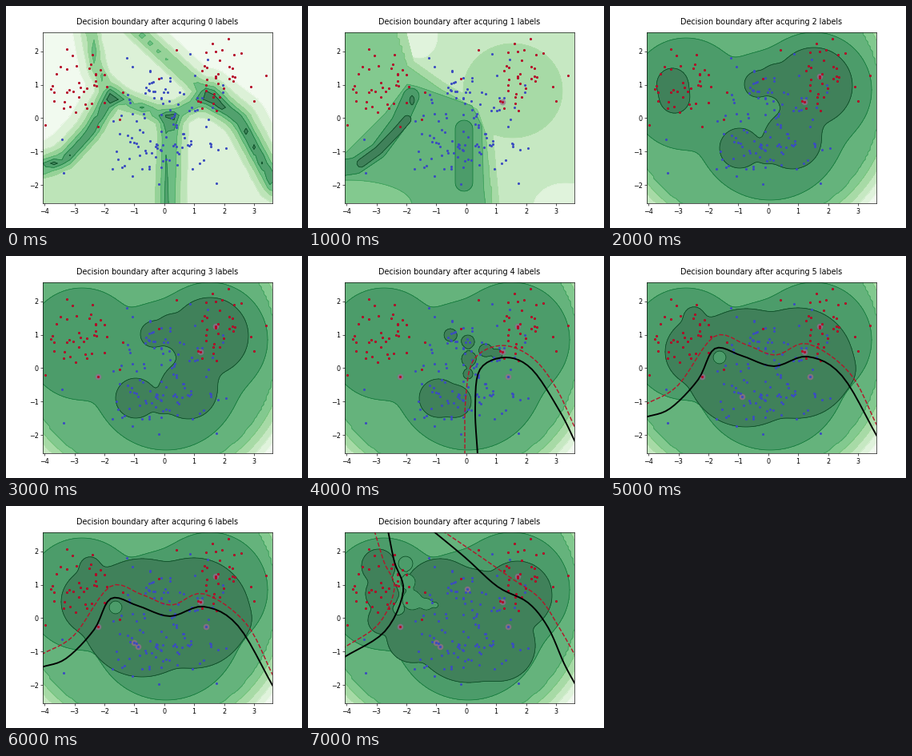
A matplotlib script for the animation above (8 s loop, 370 by 278 pixels).

```python
import numpy as np
import matplotlib.pyplot as plt
from matplotlib.animation import ArtistAnimation

W, H, DPI = 370, 278, 64
PX = 72 / DPI  # points per pixel
LEFT, RIGHT, TOP, BOTTOM = 46.25, 333, 33.36, 247.42
BLUE, RED = "#3b4cc0", "#b40426"

plt.rcParams["font.family"] = "DejaVu Sans"
fig = plt.figure(figsize=(W / DPI, H / DPI), dpi=DPI, facecolor="white")
ax = fig.add_axes([LEFT / W, 1 - BOTTOM / H, (RIGHT - LEFT) / W, (BOTTOM - TOP) / H])

# The axes use stage pixels; ticks carry the data values.
ax.set(xlim=(LEFT, RIGHT), ylim=(BOTTOM, TOP))


def names(values):
    return [str(v).replace("-", "\u2212") for v in values]


ax.set_xticks([197.7 + 37.4 * v for v in range(-4, 4)], names(range(-4, 4)))
ax.set_yticks([140.5 - 41.9 * v for v in range(-2, 3)], names(range(-2, 3)))
ax.tick_params(labelsize=8.03 * PX, length=2.8 * PX, width=0.64 * PX, pad=2.8 * PX)
for spine in ax.spines.values():
    spine.set_linewidth(0.64 * PX)


def spline(points, steps=6):
    """Open Catmull-Rom curve through the key points."""
    p = np.array(points, float)
    p = np.vstack([2 * p[0] - p[1], p, 2 * p[-1] - p[-2]])
    p0, p1, p2, p3 = (p[k:len(p) - 3 + k, None] for k in range(4))
    t = np.linspace(0, 1, steps, endpoint=False)[None, :, None]
    curve = p1 + 0.5 * t * (p2 - p0 + t * (2 * p0 - 5 * p1 + 4 * p2 - p3
                                           + t * (3 * (p1 - p2) + p3 - p0)))
    return np.vstack([curve.reshape(-1, 2), p[-2]])


class Scene:
    """Collects the artists of one frame; all shapes are fields on a grid."""

    def __init__(self, bands=8, step=3):
        self.bands = bands
        self.x, self.y = np.meshgrid(np.arange(40, 345, step), np.arange(27, 260, step))
        self.artists = []

    # Fields
    def radius(self, cx, cy, rx=1, ry=1):
        return np.hypot((self.x - cx) / rx, (self.y - cy) / ry)

    def ellipse(self, *shape):
        return 1 - self.radius(*shape)

    def discs(self, *discs, soft=5):
        """Depth inside a soft union of discs (x, y, radius)."""
        depth = [(r - self.radius(cx, cy)) / soft for cx, cy, r in discs]
        return soft * np.logaddexp.reduce(depth)

    def away(self, path):
        """Distance to a polyline."""
        best = np.full(self.x.shape, np.inf)
        for (ax_, ay), (bx, by) in zip(path, path[1:]):
            dx, dy = bx - ax_, by - ay
            t = ((self.x - ax_) * dx + (self.y - ay) * dy) / (dx * dx + dy * dy)
            t = np.clip(t, 0, 1)
            best = np.minimum(best, self.radius(ax_ + t * dx, ay + t * dy))
        return best

    # Drawing
    def fill(self, band):
        rgb = np.array(plt.cm.Greens((band + 0.5) / self.bands)[:3])
        return tuple(0.25 + 0.75 * rgb)

    def edge(self, band):
        return plt.cm.Greens(max(band - 1, 0) / (self.bands - 2))

    def draw(self, field, levels, fills, lines, edges):
        self.artists += [
            ax.contourf(self.x, self.y, field, levels, colors=fills, zorder=1),
            ax.contour(self.x, self.y, field, lines, colors=edges,
                       linewidths=0.7 * PX, zorder=1)]

    def surface(self, field):
        n = self.bands
        self.draw(np.clip(field, 0.02, n - 0.02), range(n + 1),
                  [self.fill(k) for k in range(n)], range(1, n),
                  [self.edge(k) for k in range(1, n)])

    def region(self, band, depth, edge=None):
        """Paint one band where depth is positive."""
        self.draw(depth, [0, 1e6], [self.fill(band)], [0],
                  [self.edge(edge or band)])

    def boundary(self, *points):
        self.artists += ax.plot(*spline(points).T, color="black", lw=1.9 * PX, zorder=2.3)

    def threshold(self, *points):
        self.artists += ax.plot(*spline(points).T, color="#b2182b", lw=1.45 * PX,
                                ls=(0, (3.7, 1.6)), zorder=2.3)

    def finish(self, count):
        x, y = QUERIES[:count].T
        self.artists += ax.plot(x, y, "o", ms=7.6 * PX, mew=0, color="#9c6a92",
                                alpha=0.7, zorder=2.05)
        self.artists.append(fig.text(
            189 / W, 1 - 23.2 / H, f"Decision boundary after acquring {count} labels",
            size=9.63 * PX, ha="center", va="baseline"))
        return self.artists


# The first three queried points are red, the others blue.
QUERIES = np.array([(243, 120), (262, 88), (115, 151), (250, 151), (165, 176),
                    (160, 171), (199, 104)])
rng = np.random.default_rng(4)


def cluster(cx, cy, sx, sy, count):
    points = rng.normal((cx, cy), (sx, sy), (count, 2))
    return np.clip(points, (49, 36), (331, 245))


blue = np.vstack([cluster(205, 111, 32, 24, 52), cluster(189, 176, 40, 21, 66), QUERIES[3:]])
red = np.vstack([cluster(82, 103, 23, 27, 40), cluster(267, 92, 24, 25, 36), QUERIES[:3]])
for dots, color in ((blue, BLUE), (red, RED)):
    ax.plot(*dots.T, "o", ms=3.1 * PX, mew=0, color=color, zorder=2.1)


def untrained():
    s = Scene(bands=7, step=10)
    roof = [(40, 204), (74, 192), (106, 157), (131, 113), (205, 140), (252, 112),
            (292, 142), (336, 224)]
    north = [(104, 20), (113, 76), (131, 113)]
    diagonal = [(152, 20), (252, 112)]
    south = [(205, 140), (202, 260)]

    below = s.y > np.interp(s.x, *zip(*roof))
    outside = ((s.x < np.interp(s.y, [20, 113], [104, 131]))
               | (s.x > np.interp(s.y, [20, 112], [152, 252])))
    field = np.where(below, np.where(s.x < 205, 2.4, 1.5), np.where(outside, 0.6, 1.4))
    ridges = [(roof[:4], 6.5, 17), (roof[3:6], 5.3, 16), (roof[5:], 6.6, 18),
              (north, 4.7, 14), (diagonal, 4.7, 16), (south, 6, 21)]
    for path, peak, scale in ridges:
        field = np.maximum(field, peak * np.exp(-s.away(path) / scale))
    for cx, cy, size in ((133, 113, 12), (205, 141, 12), (255, 114, 18)):
        field += 1.5 * np.exp(-s.radius(cx, cy, size, size) ** 2)
    s.surface(field)
    return s.finish(0)


def one_label():
    s = Scene()
    side = np.interp(s.y, [33, 75, 104, 130, 160, 247], [110, 124, 165, 212, 222, 231])
    edge = [(110, 20), (124, 75), (165, 104), (212, 130), (222, 160), (231, 260)]
    gap = np.where(s.x < side, -1, 1) * s.away(edge)
    s.surface(np.full(s.x.shape, 2.5))
    s.region(1, s.ellipse(139, 36, 23, 29), edge=2)
    s.region(1, s.ellipse(322, 252, 40, 30), edge=2)
    s.region(3, np.maximum(9 - gap, 61 * s.ellipse(256, 106, 62, 59)))
    s.region(4, -gap)
    roof = np.interp(s.x, [46, 97, 124, 137, 205, 217, 221],
                     [185, 134, 98, 101, 125, 150, 260])
    s.region(5, np.minimum(s.y - roof, 30 * (s.radius(50, 249, 80, 31) - 1)))
    stripe = s.away([(40, 203), (60, 200), (88, 181), (114, 146), (129, 113)])
    s.region(6, 10 - stripe)
    s.region(6, 11 - s.away([(195, 154), (195, 221)]))
    s.region(7, 5 - s.away([(66, 197), (88, 181), (112, 156), (124, 142)]))
    s.region(7, s.ellipse(130, 118, 3, 6))
    return s.finish(1)


def trained():
    """Shared surroundings: confidence fades with distance from the data."""
    s = Scene()
    s.surface(np.interp(s.radius(179, 115), [100, 160, 170, 179, 187, 195, 210],
                        [5.5, 5, 4, 3, 2, 1, 0.2]))
    s.region(6, s.discs((95, 110, 70), (200, 150, 93), (255, 105, 72), soft=7))
    return s


def red_only(count):
    s = trained()
    if count == 2:
        s.region(7, s.discs((78, 97, 19), (81, 116, 18)))
    s.region(7, s.discs((255, 100, 48), (184, 98, 16), (208, 93, 20), (240, 142, 26),
                        (162, 178, 25), (195, 183, 14), (228, 168, 36), soft=4))
    return s.finish(count)


def four_labels():
    s = trained()
    s.region(7, s.discs((178, 99, 8), (200, 107, 8), (222, 118, 8), (237, 123, 6),
                        (201, 129, 9), (200, 148, 6), (163, 178, 24), (184, 182, 20),
                        soft=3))
    s.boundary((212, 249), (209, 190), (215, 142), (247, 127), (280, 142),
               (315, 195), (335, 235))
    s.threshold((196, 249), (197, 180), (207, 130), (242, 112), (280, 127),
                (310, 165), (335, 218))
    return s.finish(4)


def arch(count):
    s = trained()
    s.region(7, s.discs((110, 120, 41), (105, 76, 12), (170, 140, 74), (235, 134, 69),
                        (285, 143, 19)))
    s.region(6, 8 - s.radius(137, 127), edge=7)
    s.boundary((44, 202), (75, 191), (110, 155), (131, 116), (165, 125), (205, 138),
               (247, 126), (290, 150), (335, 228))
    s.threshold((44, 186), (85, 162), (130, 101), (170, 111), (207, 124), (247, 110),
                (300, 147), (335, 215))
    return s.finish(count)


def seven_labels():
    s = trained()
    s.region(7, s.discs((88, 75, 21), (92, 110, 20), (92, 143, 17), (165, 112, 46),
                        (200, 150, 71), (262, 112, 43), (240, 175, 44), (130, 165, 31),
                        soft=4))
    s.region(6, s.discs((122, 72, 9), (125, 95, 9), (130, 118, 12), (148, 123, 7),
                        (160, 124, 3), soft=3), edge=7)
    s.boundary((100, 31), (108, 70), (119, 107), (96, 157), (44, 190))
    s.boundary((156, 31), (197, 65), (237, 101), (275, 121), (300, 152), (320, 197),
               (335, 225))
    s.threshold((83, 31), (95, 70), (108, 103), (88, 148), (44, 178))
    s.threshold((168, 31), (215, 63), (255, 91), (290, 116), (315, 154), (335, 189))
    return s.finish(7)


scenes = [untrained(), one_label(), red_only(2), red_only(3), four_labels(),
          arch(5), arch(6), seven_labels()]
anim = ArtistAnimation(fig, scenes, interval=1000, repeat=True, repeat_delay=0)
plt.show()
```
